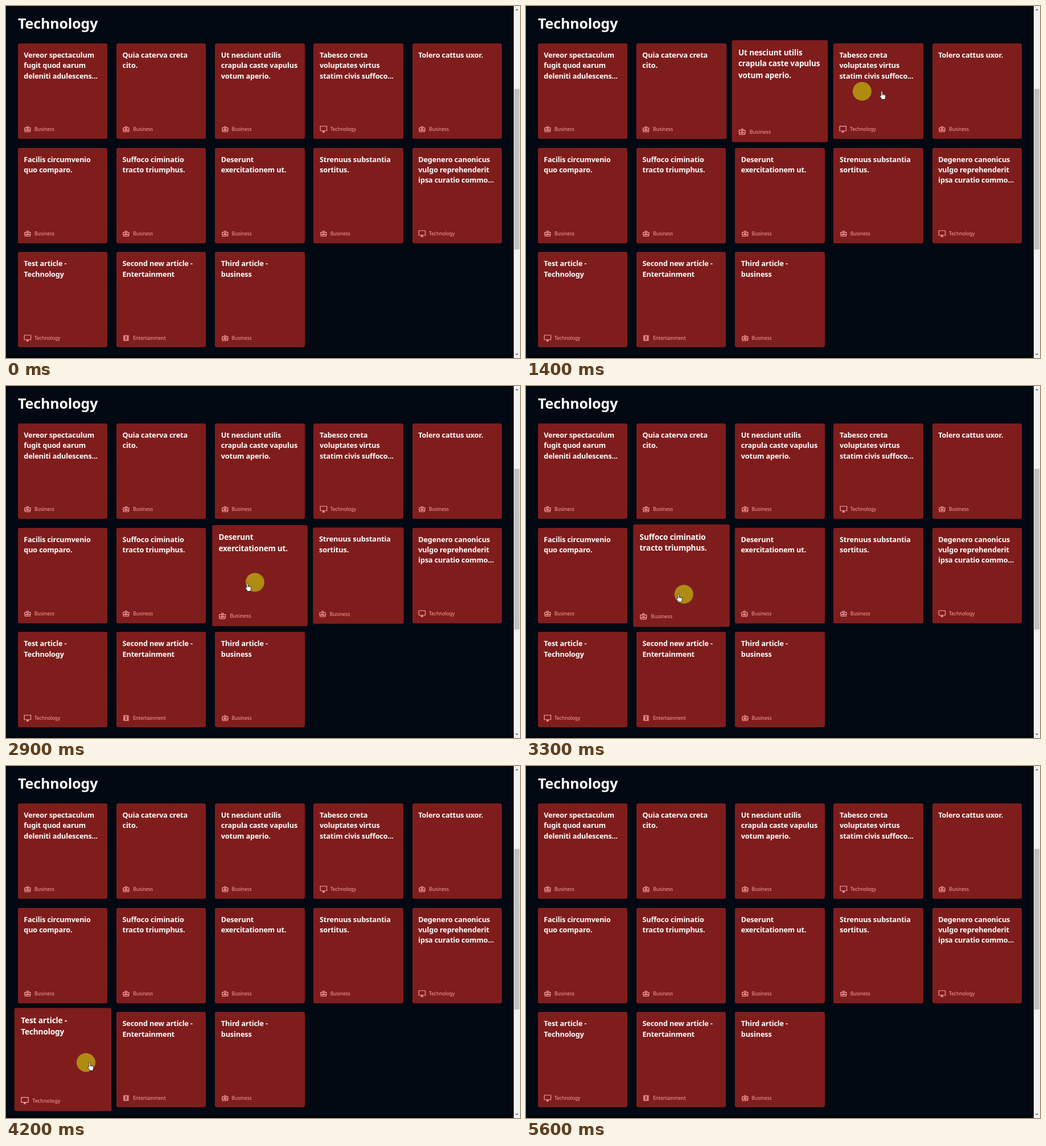
These frames come from a looping animation (903x620 px, 6 s). An HTML page:

```html
<!DOCTYPE html>
<html lang="en">
<head>
<meta charset="utf-8">
<title>Articles</title>
<style>
  html, body { margin: 0; width: 100%; height: 100%; overflow: hidden; background: #020912; }
  body { position: relative; font-family: "Noto Sans", "Open Sans", sans-serif; color: #fff; }
  body > * { position: absolute; }
  h1 {
    left: 21px; top: 12.5px; margin: 0; white-space: nowrap;
    font-size: 25px; line-height: 34px; font-weight: 700; letter-spacing: -.15px;
  }
  .card { border-radius: 3px; background: #7f1d1d; }
  .card h2 {
    position: absolute; left: 10.6px; top: 11px; margin: 0; white-space: pre;
    font-size: 12.7px; line-height: 18.4px; font-weight: 700; letter-spacing: -.15px;
  }
  .card svg { position: absolute; left: 10.4px; top: 144.2px; width: 13.8px; height: 13.8px; fill: #fca5a5; }
  .card span {
    position: absolute; left: 29.2px; top: 144.2px;
    font-size: 8.5px; line-height: 14px; color: #fca5a5; white-space: nowrap;
  }
  .edge { left: 0; top: 616px; width: 892px; height: 4px; background: #01040a; }
  .bar { left: 892px; top: 0; width: 11px; height: 620px; background: #f1f1f1; }
  .bar i { position: absolute; left: 1px; top: 146px; width: 9px; height: 283px; background: #c1c1c1; }
  .bar svg { position: absolute; left: 0; top: 0; fill: #505050; }
  #spot { left: -16.5px; top: -16.5px; width: 33px; height: 33px; border-radius: 50%; background: rgba(197, 186, 13, .7); }
  #hand { left: -3px; top: -1px; }
</style>
</head>
<body>
<h1>Technology</h1>
<div class="edge"></div>
<div class="bar">
  <i></i>
  <svg width="11" height="620"><path d="M3 7.5 5.5 5 8 7.5zM3 612.5 5.5 615 8 612.5z"/></svg>
</div>
<div id="spot"></div>
<svg id="hand" width="13" height="18" viewBox="0 0 13 18">
  <path d="M2.8 9.2V2a1.2 1.2 0 0 1 2.4 0v4.2l4.2.8q1.6.4 1.5 2l-.5 3.4-1 3.1H4.4L1.1 10.8q-.8-1.4.5-2z"
    fill="#fff" stroke="#111" stroke-width=".8"/>
  <path d="M5.2 6.2v2.6M7.2 6.8v2.2M9.1 7.2v2" stroke="#111" stroke-width=".6"/>
</svg>
<script>
  const icons = {
    Business: 'M20 7h-4V5l-2-2h-4L8 5v2H4c-1.1 0-2 .9-2 2v5c0 .75.4 1.38 1 1.73V19c0 1.11.89 2 2 2h14c1.11 0 2-.89 2-2v-3.28c.59-.35 1-.99 1-1.72V9c0-1.1-.9-2-2-2zM10 5h4v2h-4V5zM4 9h16v5h-5v-3H9v3H4V9zm9 6h-2v-2h2v2zm6 4H5v-3h4v1h6v-1h4v3z',
    Technology: 'M21 2H3c-1.1 0-2 .9-2 2v12c0 1.1.9 2 2 2h7v2H8v2h8v-2h-2v-2h7c1.1 0 2-.9 2-2V4c0-1.1-.9-2-2-2zm0 14H3V4h18v12z',
    Entertainment: 'M18 3v2h-2V3H8v2H6V3H4v18h2v-2h2v2h8v-2h2v2h2V3h-2zM8 17H6v-2h2v2zm0-4H6v-2h2v2zm0-4H6V7h2v2zm6 10h-4V5h4v14zm4-2h-2v-2h2v2zm0-4h-2v-2h2v2zm0-4h-2V7h2v2z'
  };

  const articles = [
    ['Vereor spectaculum\nfugit quod earum\ndeleniti adulescens...', 'Business'],
    ['Quia caterva creta\ncito.', 'Business'],
    ['Ut nesciunt utilis\ncrapula caste vapulus\nvotum aperio.', 'Business'],
    ['Tabesco creta\nvoluptates virtus\nstatim civis suffoco...', 'Technology'],
    ['Tolero cattus uxor.', 'Business'],
    ['Facilis circumvenio\nquo comparo.', 'Business'],
    ['Suffoco ciminatio\ntracto triumphus.', 'Business'],
    ['Deserunt\nexercitationem ut.', 'Business'],
    ['Strenuus substantia\nsortitus.', 'Business'],
    ['Degenero canonicus\nvulgo reprehenderit\nipsa curatio commo...', 'Technology'],
    ['Test article -\nTechnology', 'Technology'],
    ['Second new article -\nEntertainment', 'Entertainment'],
    ['Third article -\nbusiness', 'Business']
  ];

  // key points of the pointer's curve: time, x, y
  const path = [
    [300, 60, 168], [800, 150, 150], [1100, 310, 147], [1300, 480, 148],
    [1400, 624, 150], [1600, 800, 146], [1800, 850, 160], [1950, 830, 236],
    [2200, 722, 331], [2350, 650, 338], [2700, 541, 337], [2900, 423, 347],
    [3100, 345, 364], [3500, 192, 370], [3700, 136, 396], [3800, 131, 448],
    [3950, 124, 500], [4200, 146, 522], [4450, 255, 503], [4600, 366, 494],
    [4700, 428, 495], [4900, 506, 502], [5300, 740, 545], [5500, 770, 650]
  ];
  const first = path[0][0], last = path[path.length - 1][0];

  const spot = document.getElementById('spot');
  const hand = document.getElementById('hand');
  const loop = 6000, step = 100;
  const fade = 300, grow = .08, delay = 20; // hover response
  const lag = 26; // the spot trails the hand
  const width = 157.5, height = 168;

  // Smooth curve through the key points, with slopes taken from their neighbours
  function pointAt(t) {
    const n = Math.max(1, path.findIndex(p => p[0] >= t));
    const p = path[n - 1], q = path[n];
    const before = path[n - 2] || p, after = path[n + 1] || q;
    const span = q[0] - p[0], s = (t - p[0]) / span;
    return [1, 2].map(axis => {
      const a = (q[axis] - before[axis]) / (q[0] - before[0]) * span;
      const b = (after[axis] - p[axis]) / (after[0] - p[0]) * span;
      const d = q[axis] - p[axis];
      return p[axis] + s * (a + s * (3 * d - 2 * a - b + s * (a + b - 2 * d)));
    });
  }

  // cubic-bezier(.4, 0, .2, 1)
  function ease(x) {
    if (x <= 0) return 0;
    if (x >= 1) return 1;
    let lo = 0, hi = 1, u;
    for (let i = 0; i < 20; i++) {
      u = (lo + hi) / 2;
      const v = 1 - u;
      if (1.2 * u * v * v + .6 * u * u * v + u * u * u < x) lo = u; else hi = u;
    }
    return u * u * (3 - 2 * u);
  }

  // When the pointer enters and leaves a box
  function hoverTimes(left, top) {
    let enter = Infinity, leave = Infinity;
    for (let t = first; t <= last; t += 2) {
      const [x, y] = pointAt(t);
      if (x > left && x < left + width && y > top && y < top + height) {
        enter = Math.min(enter, t);
        leave = t;
      }
    }
    return [enter + delay, leave + delay];
  }

  const cards = articles.map(([title, kind], i) => {
    const left = 20.7 + 173.25 * (i % 5), top = 65.8 + 183.8 * Math.floor(i / 5);
    const el = document.createElement('div');
    el.className = 'card';
    el.style.cssText = `left:${left}px; top:${top}px; width:${width}px; height:${height}px`;
    el.innerHTML = `<h2>${title}</h2><svg viewBox="0 0 24 24"><path d="${icons[kind]}"/></svg><span>${kind}</span>`;
    document.body.insertBefore(el, spot);
    const [enter, leave] = hoverTimes(left, top);
    return { el, enter, leave };
  });

  function place(el, t) {
    const [x, y] = pointAt(t);
    el.style.transform = `translate(${x}px, ${y}px)`;
  }

  function draw() {
    const t = Math.floor(performance.now() % loop / step) * step;
    for (const { el, enter, leave } of cards) {
      const k = ease((t - enter) / fade) - ease((t - leave) / fade);
      el.style.transform = k > 0 ? `scale(${1 + grow * k})` : 'none';
    }
    const shown = t >= first && t <= last;
    spot.style.visibility = hand.style.visibility = shown ? 'visible' : 'hidden';
    if (shown) {
      place(hand, t);
      place(spot, Math.max(first, t - lag));
    }
    requestAnimationFrame(draw);
  }
  draw();
</script>
</body>
</html>
```
